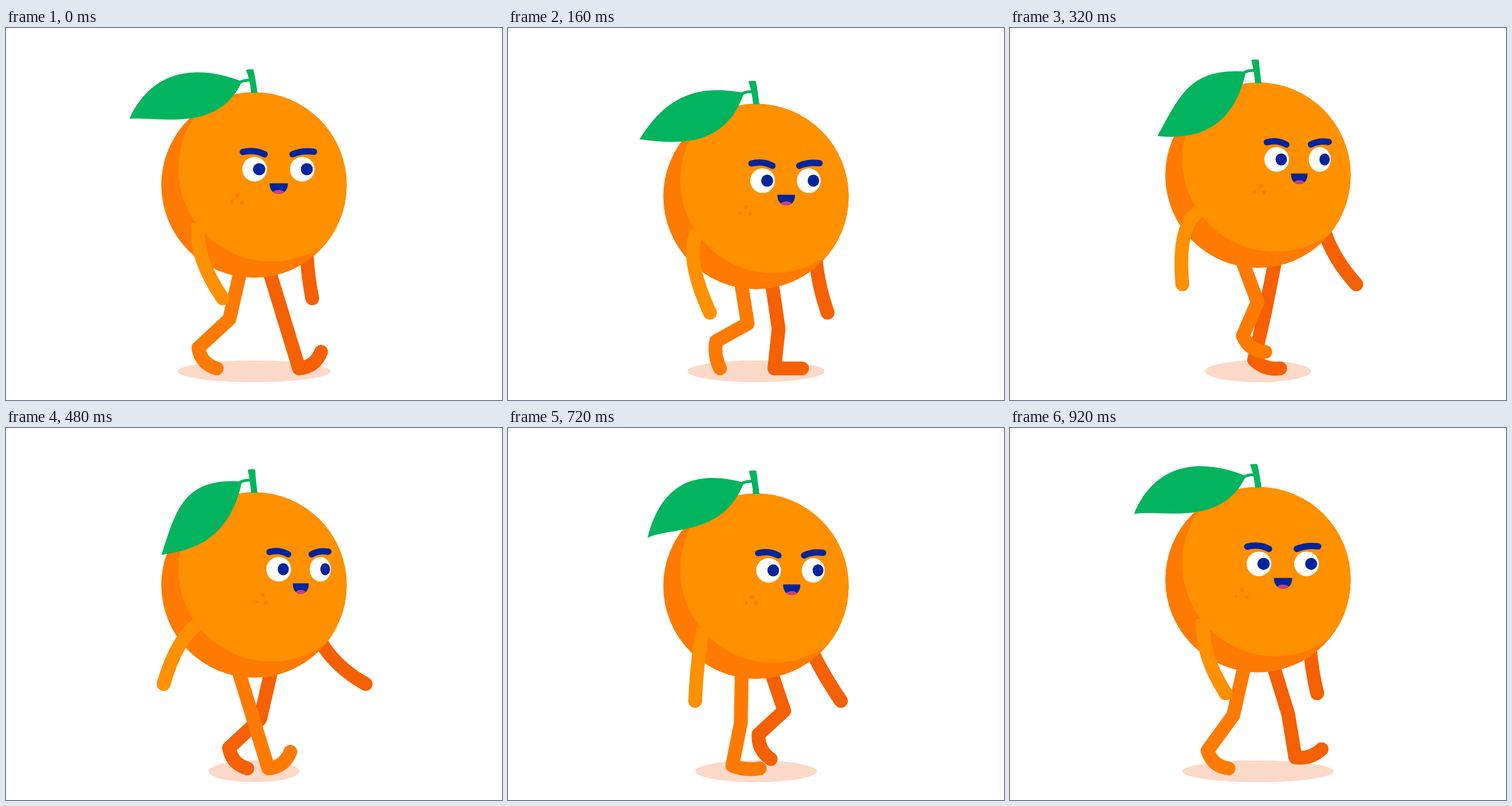
An HTML page with a canvas for the animation above (0.96 s loop, 864x648 px).

```html
<!DOCTYPE html>
<html lang="en">
<head>
<meta charset="utf-8">
<title>Walking orange</title>
<style>
html, body { margin: 0; width: 100%; height: 100%; overflow: hidden; background: #fff; }
canvas { display: block; }
</style>
</head>
<body>
<canvas id="stage" width="864" height="648"></canvas>
<script>
const ctx = document.getElementById('stage').getContext('2d');
const { sin, cos, abs, max, sqrt, hypot, PI } = Math;
const LOOP = 960, STEP = 40, LIMB = 24, GROUND = 593, FOOT = 48, REST_Y = 273.5;
const LIGHT = '#ff9000', MID = '#ff7a00', DEEP = '#f56000';
const GREEN = '#02b45e', BLUE = '#00249c';

function oval(x, y, rx, ry, color) {
  ctx.fillStyle = color;
  ctx.beginPath();
  ctx.ellipse(x, y, rx, ry, 0, 0, 2 * PI);
  ctx.fill();
}

function stroke(path, width, color, cap = 'round') {
  ctx.lineWidth = width;
  ctx.strokeStyle = color;
  ctx.lineCap = cap;
  ctx.lineJoin = 'round';
  ctx.stroke(new Path2D(path));
}

function fill(path, color) {
  ctx.fillStyle = color;
  ctx.fill(new Path2D(path));
}

function arm(shoulder, bend, handX, swing, color) {
  const handY = 473.5 + 12.5 * swing - 15 * swing * swing;
  stroke(`M${shoulder}Q${bend} ${handX} ${handY}`, LIMB, color, 'butt');
  oval(handX, handY, LIMB / 2, LIMB / 2, color);
}

function nearArm(angle) {
  const swing = cos(angle), side = sin(angle), drag = cos(angle + 0.8);
  arm([334.5 - 5.5 * side, 341 - 6.4 * side], [313 + 22.6 * drag, 384 + 24 * drag],
    326 + 51.5 * swing, swing, LIGHT);
}

function farArm(angle) {
  const swing = cos(angle), side = sin(angle);
  arm([536 - 12.3 * swing + 7 * side, 381.5 + 9 * swing - 4 * side],
    [550 - 24.3 * swing + 3 * side, 425 + 8.3 * swing],
    580 - 46.5 * swing, swing, DEEP);
}

// Foot pitch from heel strike (p = 0) through toe-off to the next strike
function footPitch(p) {
  const degrees = p < 0.08 ? -37 * (1 - p / 0.08)
    : p < 2 / 3 ? 82 * max(0, (p - 0.2) / 0.467) ** 1.2
    : 82 - 119 * (3 * p - 2) ** 1.35;
  return degrees * PI / 180;
}

function leg(p, hipX, hipY, color) {
  const pitch = footPitch(p), swing = max(0, 3 * p - 2);
  const stride = p < 0.5 ? 1 - (2 * p) ** 0.88 : (2 * p - 1) ** 1.35;
  const heelX = hipX - 72 + 122 * stride;
  const heelY = swing
    ? 545.5 + 47.5 * swing ** 2 - 21 * sin(PI * swing)
    : GROUND - FOOT * max(0, sin(pitch));
  const toeX = heelX + FOOT * cos(pitch), toeY = heelY + FOOT * sin(pitch);
  const bow = 15 * sqrt(abs(sin(2 * pitch)));
  const bendX = (heelX + toeX) / 2 - bow * sin(pitch);
  const bendY = (heelY + toeY) / 2 + bow * cos(pitch);

  // The knee bulges forward, at right angles to the line from hip to heel
  const dx = heelX - hipX, dy = heelY - hipY, length = hypot(dx, dy);
  const bulge = p < 0.35 ? 9 * sin(PI * p / 0.35) : 37 * sin(PI * (p - 0.35) / 0.65) ** 1.2;
  const kneeX = hipX + 0.52 * dx + bulge * dy / length;
  const kneeY = hipY + 0.52 * dy - bulge * dx / length;

  stroke(`M${hipX} ${hipY}L${kneeX} ${kneeY}L${heelX} ${heelY}Q${bendX} ${bendY} ${toeX} ${toeY}`,
    LIMB, color);
}

function body() {
  oval(432, REST_Y, 161.5, 161.5, MID);
  ctx.save();
  ctx.beginPath();
  ctx.arc(432, REST_Y, 161.5, 0, 2 * PI);
  ctx.clip();
  oval(462, 245, 162, 162, LIGHT);
  ctx.restore();
}

// The tip follows the walk, the edges flex slightly ahead of it
function leaf(angle) {
  const swing = cos(angle), flex = cos(angle + 0.45);
  const tip = [243 - 28 * swing, 189.5 - 31.5 * swing];
  const upper = [[334 + 26 * flex, 79.5 - 8 * flex], [280 - 19 * flex, 97 - 47 * flex]];
  const lower = [[293 - 27 * flex, 184 - 33 * flex], [379 - 10 * flex, 192 - 10 * flex]];
  fill(`M411 93C${upper} ${tip}C${lower} 411 93Z`, GREEN);
  stroke('M408 94.5Q414 90.5 425 91', 5, GREEN);

  const top = 419.5 - 1.5 * swing;
  fill(`M${top} 73Q${top + 7} 71 ${top + 13} 72.5Q435 90 438 113H427Q425 90 ${top} 73Z`, GREEN);
}

function face(swing) {
  const turn = (a, b) => (a + b + (a - b) * swing) / 2;
  oval(turn(433, 475), 246, 21.5, 21.5, '#fff');
  oval(turn(516, 547.5), 246, turn(21.5, 18.5), 21.5, '#fff');
  oval(turn(441, 483), 246, turn(10.7, 9.7), 10.5, BLUE);
  oval(turn(524, 556), 246, turn(10.5, 8.5), 10.5, BLUE);
  stroke(`M${turn(412.5, 459)} 216Q${turn(433, 476)} 211 ${turn(450.5, 491.5)} 220`, 11, BLUE);
  stroke(`M${turn(499, 532.5)} 220Q${turn(515, 545)} 213 ${turn(536.5, 561.5)} 215.5`, 11, BLUE);

  const x = turn(475, 513.5), w = turn(16, 14);
  const mouth = `M${x - w} 270.5H${x + w}C${x + w} 283 ${x + w * .55} 289 ${x} 289S${x - w} 283 ${x - w} 270.5Z`;
  fill(mouth, BLUE);
  ctx.save();
  ctx.clip(new Path2D(mouth));
  oval(x, 289, w * .7, 7, '#cc3f80');
  ctx.restore();

  oval(turn(403, 447), 292, 3.8, 3.8, MID);
  oval(turn(393, 437), 302.5, 2.8, 2.8, MID);
  oval(turn(411.5, 453), 304, 3.5, 3.5, MID);
}

function draw(time) {
  const phase = time / LOOP, angle = 2 * PI * phase, swing = cos(angle);
  const bob = 1 + 21.4 * sin(2 * angle) - cos(2 * angle) - 1.2 * sin(6 * angle);
  const hipY = REST_Y + bob + 156;

  ctx.setTransform(1, 0, 0, 1, 0, 0);
  ctx.fillStyle = '#fff';
  ctx.fillRect(0, 0, 864, 648);
  oval(432, 598, 106 + 27 * swing, 19, '#fbd9c8');

  ctx.translate(0, bob);
  farArm(angle);
  ctx.translate(0, -bob);
  leg(phase, 460.5, hipY, DEEP);
  leg((phase + 0.5) % 1, 407, hipY, MID);
  ctx.translate(0, bob);
  body();
  leaf(angle);
  nearArm(angle);
  face(swing);
}

const start = performance.now();
function tick() {
  const elapsed = (performance.now() - start) % LOOP;
  draw(Math.floor(elapsed / STEP) * STEP);
  requestAnimationFrame(tick);
}
tick();
</script>
</body>
</html>
```
